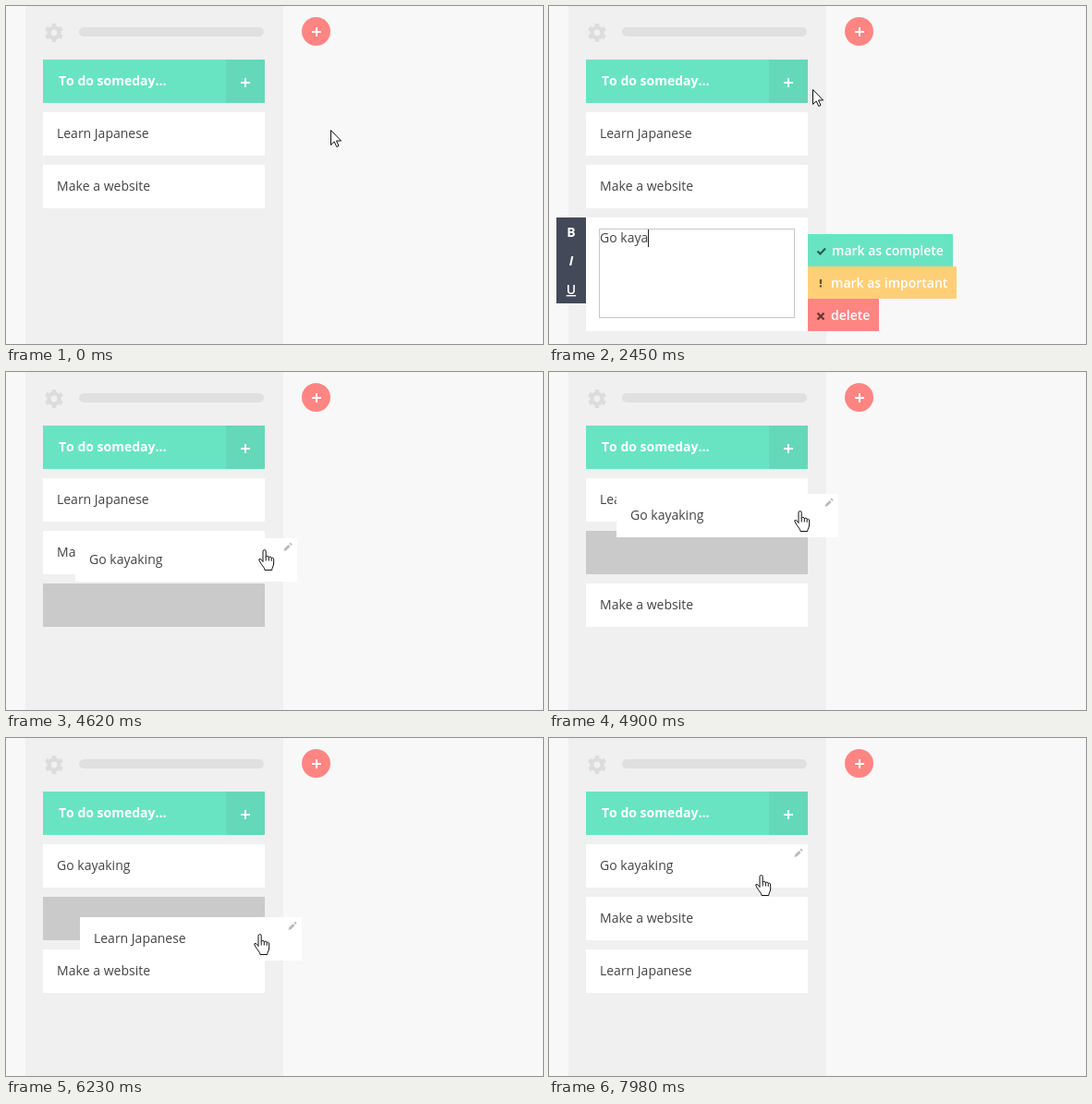
An HTML page that plays this animation: 581 by 366 pixels, repeating every 8 s.

```html
<!DOCTYPE html>
<html lang="en">
<head>
<meta charset="utf-8">
<title>To-do list</title>
<style>
  html, body { margin: 0; width: 100%; height: 100%; overflow: hidden; background: #f8f8f8; }
  svg { display: block; }
  text { font: 14px "Open Sans", sans-serif; font-kerning: none; fill: #444; white-space: pre; }
  .bold { font-weight: 700; fill: #fff; }
  .semi { font-weight: 600; fill: #fff; }
</style>
</head>
<body>
<svg id="stage" width="581" height="366" viewBox="0 0 581 366"></svg>
<script>
const LOOP = 8000, STEP = 70, SETTLE = 350;
const OPEN = 1120, CLOSE = 3010, TYPE_START = 1610, TYPE_INTERVAL = 126;
const CARD_X = 40, CARD_W = 240, CARD_H = 47, FIRST_Y = 115, PITCH = 57;
const MINT = '#69e4c2', CORAL = '#ff8582', AMBER = '#ffcf77', SLATE = '#434959';
const LEARN = 'Learn Japanese', MAKE = 'Make a website', GO = 'Go kayaking';
const stage = document.getElementById('stage');
const ruler = document.createElement('canvas').getContext('2d');

// The cursor rests between moves.
const cursorStart = [351, 134];
const moves = [
  { from: 280, to: 700, x: 258, y: 80 },
  { from: 1050, to: 1120, x: 285, y: 90 },
  { from: 3570, to: 3640, x: 300, y: 91 },
  { from: 3640, to: 3850, x: 342, y: 160 },
  { from: 3850, to: 4130, x: 241, y: 262 },
  { from: 4340, to: 4550, x: 276, y: 213 },
  { from: 4550, to: 4620, x: 280, y: 192 },
  { from: 4620, to: 5110, x: 266, y: 123 },
  { from: 5320, to: 5880, x: 236, y: 187 },
  { from: 5950, to: 6160, x: 276, y: 209 },
  { from: 6160, to: 6720, x: 253, y: 273 },
  { from: 6860, to: 7210, x: 246, y: 281 },
  { from: 7420, to: 7980, x: 230, y: 148 }
];
const drags = [
  { name: GO, press: 4340, drop: 5320 },
  { name: LEARN, press: 5950, drop: 6860 }
];

const clamp = (v, low, high) => Math.min(high, Math.max(low, v));
const ease = k => k * k * (3 - 2 * k);
const slotY = slot => FIRST_Y + PITCH * slot;
const inside = ([px, py], x, y, w, h) => px >= x && px < x + w && py >= y && py < y + h;

function cursorAt(t) {
  let [x, y] = cursorStart;
  for (const move of moves) {
    const k = ease(clamp((t - move.from) / (move.to - move.from), 0, 1));
    x += (move.x - x) * k;
    y += (move.y - y) * k;
  }
  return [Math.round(x), Math.round(y)];
}

// A held card trails the cursor by one step and takes a slot once it has fully reached it.
function dragState(drag, home, last, t) {
  const [pressX, pressY] = cursorAt(drag.press);
  const [x, y] = cursorAt(Math.min(t, drag.drop) - STEP);
  const heldX = CARD_X + x - pressX, heldY = slotY(home) + y - pressY;
  const row = (heldY - FIRST_Y) / PITCH;
  const slot = clamp(row < home ? Math.ceil(row) : Math.floor(row), 0, last);
  const k = ease(clamp((t - drag.drop) / SETTLE, 0, 1));
  return {
    name: drag.name, slot, held: t < drag.drop, settled: k === 1,
    x: heldX + (CARD_X - heldX) * k, y: heldY + (slotY(slot) - heldY) * k
  };
}

function listAt(t) {
  const order = t < CLOSE ? [LEARN, MAKE] : [LEARN, MAKE, GO];
  let active = null;
  for (const drag of drags.filter(d => t > d.press)) {
    const home = order.indexOf(drag.name);
    const state = dragState(drag, home, order.length - 1, t);
    order.splice(home, 1);
    order.splice(state.slot, 0, drag.name);
    if (!state.settled) active = state;
  }
  return { order, active };
}

const rect = (x, y, w, h, fill, more = '') =>
  `<rect x="${x}" y="${y}" width="${w}" height="${h}" fill="${fill}" ${more}/>`;
const text = (x, y, words, more = '') => `<text x="${x}" y="${y}" ${more}>${words}</text>`;
const path = (d, stroke, width, more = '') =>
  `<path d="${d}" fill="none" stroke="${stroke}" stroke-width="${width}" ${more}/>`;
const plus = (x, y) => path(`M${x - 5} ${y}h10M${x} ${y - 5}v10`, '#fff', 2);

function card(x, y, name, hover) {
  const pencil = `<path transform="translate(${x + 230} ${y + 9.5}) scale(.9)" fill="#bbb"
    d="M-5 5l1-3.4 4.5-4.5 2.4 2.4-4.5 4.5zM1.6-4l1-1q.4-.3.8 0l1.5 1.5q.3.4 0 .8l-1 1z"/>`;
  return rect(x, y, CARD_W, CARD_H, '#fff') + text(x + 15, y + 28, name) + (hover ? pencil : '');
}

function background(buttonHover) {
  return rect(0, 0, 581, 366, '#f8f8f8') + rect(21, 0, 279, 366, '#f0f0f0') +
    `<g fill="none" stroke="#dcdcdc"><circle cx="52" cy="29" r="5.6" stroke-width="4.4"/>
     <circle cx="52" cy="29" r="8.4" stroke-width="3.4" pathLength="12"
       stroke-dasharray="1 1" stroke-dashoffset="-.5"/></g>` +
    rect(79, 23, 200, 10, '#e0e0e0', 'rx="5"') +
    rect(CARD_X, 58, CARD_W, CARD_H, MINT) +
    rect(238, 58, 42, CARD_H, buttonHover ? '#51d3b1' : '#65d8b9') +
    text(57, 86, 'To do someday...', 'class="bold"') + plus(259, 83) +
    `<circle cx="335.5" cy="27.5" r="15.5" fill="${CORAL}"/>` + plus(336, 28);
}

function editor(t) {
  const typed = GO.slice(0, Math.max(0, 1 + Math.floor((t - TYPE_START) / TYPE_INTERVAL)));
  ruler.font = '14px "Open Sans", sans-serif';
  ruler.fontKerning = 'none';
  const caret = 55 + Math.floor(ruler.measureText(typed).width);
  const format = (label, y, style) =>
    text(24, y, label, `class="bold" text-anchor="middle" style="${style}"`);
  const action = (y, width, fill, x, label, icon) =>
    rect(280, y, width, 35, fill) + text(x, y + 23, label, 'class="semi"') +
    path(icon, '#000', 2.2, 'stroke-opacity=".6"');
  return rect(CARD_X, 229, CARD_W, 123, '#fff') +
    rect(54.5, 241.5, 211, 96, '#fff', 'stroke="#c6c6c6"') +
    text(55, 256, typed) + rect(caret, 242, 1, 19, '#222') +
    rect(8, 229, 32, 93, SLATE) + format('B', 250, '') +
    format('I', 281, 'font-style:italic') +
    format('U', 312, 'font-weight:600;text-decoration:underline') +
    action(247, 157, MINT, 306, 'mark as complete', 'M290.5 265.5l3 3 5.5-6') +
    action(282, 161, AMBER, 305, 'mark as important', 'M294 296v5M294 302.2v2.2') +
    action(317, 77, CORAL, 305, 'delete', 'M290.5 332.5l7 7M297.5 332.5l-7 7');
}

function cursor([x, y]) {
  const hand = x < 283;
  const shape = hand
    ? 'M5 13.5V2.2a1.6 1.6 0 0 1 3.2 0V8.5q.3-1.2 1.6-1.1 1.4 0 1.5 1.5.5-1 1.6-.8 1.2.1 1.3 1.6.5-.8 1.4-.5 1.1.3 1.1 1.8V15q0 2-1 4-.9 1.5-1 3.5H7q-.2-2-1.5-3.5-2-2.5-3.5-5-1.5-2.5-1.2-3.2 1.3-1 2.6.5z' +
      'M8.2 8.5v4M11.3 9v3.5M14.2 9.8v3'
    : 'M.5.5V16.5L4.2 13l2.6 5.5 2.2-1L6.5 12H11.6Z';
  return `<path transform="translate(${hand ? x - 7 : x} ${y})" d="${shape}"
    fill="#fff" stroke="#111" stroke-linejoin="round"/>`;
}

function scene(t) {
  const tip = cursorAt(t);
  const { order, active } = listAt(t);
  const editing = t >= OPEN && t < CLOSE;
  let picture = background(inside(tip, 238, 58, 42, CARD_H) || t === OPEN);
  order.forEach((name, slot) => {
    const y = slotY(slot);
    if (!active || active.name !== name)
      picture += card(CARD_X, y, name, !active && inside(tip, CARD_X, y, CARD_W, CARD_H));
    else if (active.held) picture += rect(CARD_X, y, CARD_W, CARD_H, '#cacaca');
  });
  if (active) picture += card(active.x, active.y, active.name, true);
  if (editing) picture += editor(t);
  return picture + cursor(tip);
}

let shown = -1;
function play() {
  const t = Math.floor(performance.now() % LOOP / STEP) * STEP;
  if (t !== shown) stage.innerHTML = scene(shown = t);
  requestAnimationFrame(play);
}
play();
</script>
</body>
</html>
```
